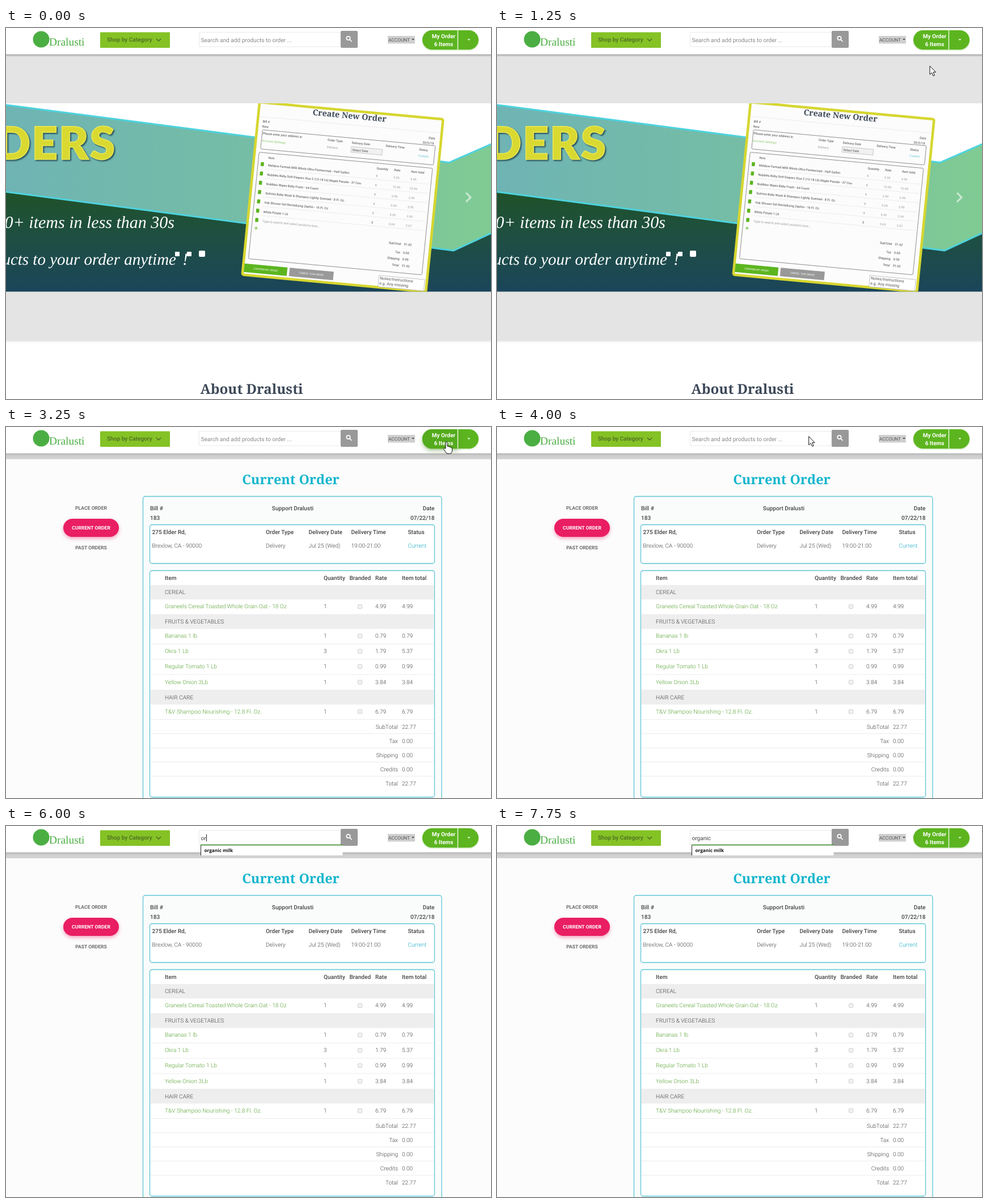
Recreate the animation shown at these times as an HTML page. Size 855 by 655 pixels, loop 8000 ms.

```html
<!DOCTYPE html>
<html lang="en">
<head>
<meta charset="utf-8">
<title>Grocery order</title>
<style>
html, body { margin: 0; width: 100%; height: 100%; overflow: hidden; background: #fff; }
svg { display: block; text-rendering: geometricPrecision; }
text { font: 400 10.1px Roboto, sans-serif; fill: #555; white-space: pre; }
.b { font-weight: 500; fill: #444; }
.l { font-weight: 300; fill: #444; }
.g { font-weight: 300; fill: #55a030; }
.m { text-anchor: middle; }
.e { text-anchor: end; }
.w { font-weight: 700; font-size: 10px; fill: #fff; }
.nav { font-size: 8.65px; font-weight: 500; }
.head { font: 700 23.4px "Roboto Slab", "Noto Serif", serif; }
.script { font: italic 400 30px "Liberation Serif", serif; fill: #fff; }
.big { font: 900 80px Lato, sans-serif; letter-spacing: 2px; fill: #d9d931; stroke: #ebe957; stroke-width: 1.5; filter: drop-shadow(2px 2px 1px #29525c); }
.s { font-size: 5.5px; font-weight: 500; fill: #666; }
.f { font-size: 5.5px; fill: #999; }
.tiny { font-size: 4.5px; fill: #fff; }
.note { font-size: 7px; }
.drop { font: 700 8.2px "Open Sans", sans-serif; fill: #111; }
.box { fill: #fff; stroke: #5ec6d6; stroke-width: 1.3; }
.line { stroke: #ececec; }
</style>
</head>
<body>
<svg width="855" height="655" viewBox="0 0 855 655">
  <defs>
    <linearGradient id="band"><stop stop-color="#6fb4b4"/><stop offset=".5" stop-color="#75bda5"/><stop offset="1" stop-color="#80cb93"/></linearGradient>
    <linearGradient id="dark" x2="0" y2="1"><stop stop-color="#1f5229"/><stop offset=".45" stop-color="#1f4f42"/><stop offset="1" stop-color="#1b455a"/></linearGradient>
    <linearGradient id="shade" x2="0" y2="1"><stop stop-color="#000" stop-opacity=".32"/><stop offset="1" stop-color="#000" stop-opacity="0"/></linearGradient>
    <linearGradient id="strip" x2="0" y2="1"><stop stop-color="#adadad"/><stop offset=".4" stop-color="#cdcdcd"/><stop offset="1" stop-color="#d6d6d6"/></linearGradient>
    <clipPath id="slide"><path d="M0 133H855V465.500H0Z"/></clipPath>
  </defs>

  <g id="home">
    <path fill="#fff" d="M0 0H855V655H0Z"/>
    <path fill="#e4e4e4" d="M0 46H855V552H0Z"/>
    <path fill="url(#shade)" d="M0 46H855V51H0Z"/>
    <path fill="url(#shade)" opacity=".3" d="M0 552H855V556H0Z"/>
    <g clip-path="url(#slide)">
      <path fill="#fff" d="M0 133H855V466H0Z"/>
      <path fill="url(#dark)" d="M0 289 790 393 855 362V466H0Z"/>
      <path fill="url(#band)" stroke="#4dd3df" stroke-width="3" d="M-5 135 781 237.500 860 203V360L789 393-5 288.500Z"/>
      <text class="big e" x="194" y="232">DERS</text>
      <text class="script e" x="297" y="353">0+ items in less than 30s</text>
      <text class="script e" x="300" y="418" style="font-size:29px">ucts to your order anytime</text>
      <text class="script" x="311" y="418">!</text>
      <g fill="#fff"><rect x="298" y="395" width="8" height="8" rx="1"/><rect x="319" y="395" width="8" height="8" rx="1"/><rect x="340" y="393" width="11" height="11" rx="2"/></g>
      <g id="card" transform="translate(447 131) rotate(5.3) skewX(-.4)"></g>
      <path d="M811 291l8 8-8 8" fill="none" stroke="#fff" stroke-opacity=".6" stroke-width="3"/>
    </g>
    <text class="head m" x="433" y="646" style="font-size:24.200px;fill:#3c4858">About Dralusti</text>
  </g>

  <g id="order">
    <path fill="#fcfcfc" d="M0 0H855V655H0Z"/>
    <path fill="url(#strip)" d="M0 46H855V57H0Z"/>
    <text class="head m" x="502" y="101" style="fill:#14b5cd">Current Order</text>
    <rect x="101" y="162" width="98" height="32" rx="16" fill="#e91e63" style="filter:drop-shadow(0 3px 3px #e91e6366)"/>
    <rect class="box" x="241.500" y="122.500" width="526.500" height="560" rx="4" style="fill:#fafcfc"/>
    <rect class="box" x="253.500" y="172.500" width="502" height="68.500" rx="4"/>
    <rect class="box" x="253.500" y="253.500" width="502" height="400" rx="4"/>
    <g id="bill"></g>
  </g>

  <g id="header">
    <path fill="#fff" d="M0 0H855V46.500H0Z"/>
    <circle cx="62" cy="20" r="14.500" fill="#4bae43"/>
    <text x="76" y="30.500" style="font:19.400px 'Liberation Serif',serif;fill:#4bae43">Dralusti</text>
    <rect x="166" y="7.500" width="123" height="27.500" rx="1" fill="#84c225"/>
    <text class="b" x="178" y="24" style="fill:#4d6a25">Shop by Category</text>
    <path d="M265 19l4 4 4-4" fill="none" stroke="#4d6a25" stroke-width="1.500"/>
    <path d="M340.500 7.500H590V33H340.500Z" fill="#fff" stroke="#e9e9e9"/>
    <text id="hint" x="343.500" y="24.500" style="fill:#888">Search and add products to order ...</text>
    <rect x="590" y="5" width="30" height="30" rx="2" fill="#999"/>
    <g fill="none" stroke="#fff" stroke-width="1.700"><circle cx="603.500" cy="18" r="3.200"/><path d="M606 20.500l3.500 3.500"/></g>
    <path fill="#cfcfcf" d="M673 14H721V27.500H673Z"/>
    <text x="674" y="23.500" style="font-size:8.300px">ACCOUNT</text>
    <path d="M715 19h5l-2.500 2.500Z" fill="#444"/>
    <rect x="734" y="4" width="99" height="34" rx="17" fill="#5cb51f" style="filter:drop-shadow(0 1px 1px #5cb51f88)"/>
    <path id="hover" d="M797 4H751a17 17 0 0 0 0 34H797Z" fill="#54ab1c" style="filter:drop-shadow(0 4px 4px #46851f66)"/>
    <path d="M796.500 4V38" stroke="#e9f6df" stroke-width="1.500"/>
    <text class="w m" x="771.500" y="17.500">My Order</text>
    <text class="w m" x="771.500" y="31.500">6 Items</text>
    <path d="M813.500 19.500h5l-2.500 2.500Z" fill="#fff"/>
  </g>

  <g id="menu">
    <rect id="panel" x="343" y="33" width="250.500" fill="#fff"/>
    <path id="side" stroke="#222"/>
    <path d="M343 33.500H593.500" stroke="#35851f" stroke-width="1.300"/>
    <g id="options"></g>
  </g>
  <text id="typed" x="343.500" y="24.500" style="fill:#444"></text>
  <path id="caret" stroke="#222"/>
  <g id="cursor" stroke="#111" fill="#fff" stroke-linejoin="round">
    <path id="arrow" d="M0 0V15L3.500 12 6 17.500 8.500 16.500 6 11H10.500Z"/>
    <path id="hand" d="M4 11V2q0-2 1.500-2T7 2V8q3-.5 3 1 3-.5 3 1 2.500-.5 2.500 2V16q0 5-5 5H8q-3 0-4-3L0 12.500q0-2 4-.5Z"/>
    <path id="beam" fill="none" d="M-3 0H3M0 0V16M-3 16H3"/>
  </g>
</svg>
<script>
const $ = id => document.getElementById(id);
const T = (x, y, s, cls = '') => `<text x="${x}" y="${y}" class="${cls}">${s}</text>`;
const R = (x, y, w, h, attrs) => `<rect x="${x}" y="${y}" width="${w}" height="${h}" ${attrs}/>`;
const L = (x1, y, x2) => `<path class="line" d="M${x1} ${y}H${x2}"/>`;

function drawCard() {
  const items = [
    ['Meldow Farmed Milk Whole Ultra Pasteurized - Half Gallon', 1, '5.59', '5.59'],
    ['Nubbles Baby Soft Diapers Size 2 (12-18 Lb) Maple Parade - 37 Cou', 1, '10.99', '10.99'],
    ['Nubbles Wipes Baby Fresh - 64 Count', 1, '2.99', '2.99'],
    ['Solmira Baby Wash &amp; Shampoo Lightly Scented - 8 Fl. Oz.', 1, '5.99', '5.99'],
    ['Vok Shower Gel Revitalizing Zephin - 16 Fl. Oz', 1, '3.99', '3.99'],
    ['White Potato 1 Lb', 3, '0.69', '2.07'],
  ];
  const frame = 'fill="none" stroke="#777" stroke-width=".8"';
  let s = R(0, 0, 325, 306, 'rx="3" fill="#fcfcfc" stroke="#d6d630" stroke-width="4.500"')
    + '<text class="head" x="95" y="14" style="font-size:14.300px;fill:#3c4858">Create New Order</text>'
    + L(3, 25, 322) + R(10, 48, 306, 34, frame + ' rx="2"') + R(8, 88, 307, 189, frame + ' rx="2"')
    + R(169, 63, 55, 10, 'fill="#f1f1f1" stroke="#aaa" stroke-width=".6"');
  for (const [x, y, str] of [[9, 35, 'Bill #'], [9, 44, 'New'], [303, 37, 'Date'], [293, 46, '20/5/18'],
    [11, 56, 'Please enter your address in'], [126, 57, 'Order Type'], [169, 58, 'Delivery Date'],
    [229, 58, 'Delivery Time'], [288, 59, 'Status'], [171, 70.5, 'Select Date'], [25, 98, 'Item'],
    [217, 99, 'Quantity'], [248, 99, 'Rate'], [278, 99, 'Item total']]) s += T(x, y, str, 's');
  s += T(11, 69, '<tspan fill="#8bc96a">Account Settings</tspan>', 'f') + T(126, 69.5, 'Delivery', 'f')
    + T(288, 70, '<tspan fill="#5cc5d6">Current</tspan>', 'f');
  items.forEach(([name, qty, rate, total], i) => {
    const y = 111.5 + 16.5 * i;
    s += T(26, y, name, 's') + T(217, y + 1, qty, 's') + T(248, y + 1, rate, 'f') + T(278, y + 1, total, 'f')
      + L(22, y + 5, 312);
  });
  for (let i = 0; i < 7; i++) s += R(13, 105 + 16.5 * i, 5.5, 7, 'rx="1" fill="#5cb51f"');
  s += T(26, 210.5, 'Type to search and select products here...', 'f')
    + '<path d="M13 222h6m-3-3v6" stroke="#5cb51f"/>';
  [['SubTotal', '31.62', 228], ['Tax', '0.00', 243], ['Shipping', '0.00', 254.5], ['Total', '31.62', 266]]
    .forEach(([k, v, y]) => s += T(273, y, k, 's e') + T(278, y, v, 's'));
  s += R(2, 286, 76, 15, 'fill="#5cb51f"') + R(82, 286, 78, 15, 'fill="#999"')
    + T(40, 295, 'CONFIRM MY ORDER', 'tiny m') + T(121, 295, 'CANCEL THIS ORDER', 'tiny m')
    + R(240, 285, 81, 20, 'fill="#fff" stroke="#aaa" stroke-width=".7"')
    + T(242, 292, 'Notes/Instructions', 'note') + T(242, 301, 'e.g. Any missing', 'note');
  $('card').innerHTML = s;
}

function drawBill() {
  const cols = [280, 560, 651, 698];
  let s = T(150, 145.5, 'PLACE ORDER', 'nav m') + T(150, 216, 'PAST ORDERS', 'nav m')
    + '<text class="nav m" x="150" y="180.500" style="fill:#fff;font-weight:700">CURRENT ORDER</text>';
  for (const [x, y, str, cls] of [[254, 146.5, 'Bill #', 'b'], [254, 164, '183', 'b'],
    [505.5, 146.5, 'Support Dralusti', 'b m'], [755.5, 146.5, 'Date', 'b e'], [755.5, 164, '07/22/18', 'b e'],
    [257.5, 188.5, '275 Elder Rd,', 'b'], [458, 188.5, 'Order Type', 'b'], [533.5, 188.5, 'Delivery Date', 'b'],
    [608.5, 188.5, 'Delivery Time', 'b'], [708.5, 188.5, 'Status', 'b'], [257.5, 213, 'Brexlow, CA - 90000', 'l'],
    [458, 213, 'Delivery', 'l'], [533.5, 213, 'Jul 25 (Wed)', 'l'], [608.5, 213, '19:00-21:00', 'l'],
    [708.5, 213, '<tspan fill="#14a9c4">Current</tspan>', 'l'], [605.5, 270, 'Branded', 'b']]) s += T(x, y, str, cls);
  ['Item', 'Quantity', 'Rate', 'Item total'].forEach((h, i) => s += T(cols[i], 270, h, 'b'));
  [[279, 'CEREAL'], [331, 'FRUITS &amp; VEGETABLES'], [464.5, 'HAIR CARE']]
    .forEach(([y, name]) => s += R(254.5, y, 500.5, 25.5, 'fill="#eeeeee"') + T(280, y + 16, name, 'l'));
  [[320, 'Graneels Cereal Toasted Whole Grain Oat - 18 Oz', 1, '4.99', '4.99'],
    [372, 'Bananas 1 lb', 1, '0.79', '0.79'], [399, 'Okra 1 Lb', 3, '1.79', '5.37'],
    [426, 'Regular Tomato 1 Lb', 1, '0.99', '0.99'], [453.5, 'Yellow Onion 3Lb', 1, '3.84', '3.84'],
    [505.5, 'T&amp;V Shampoo Nourishing - 12.8 Fl. Oz.', 1, '6.79', '6.79']]
    .forEach(([y, ...cells]) => {
      cells.forEach((c, i) => s += T(cols[i], y, c, i ? 'l' : 'g'));
      s += R(620.5, y - 6.5, 7, 7, 'rx="1" fill="#f2f2f2" stroke="#cfcfcf"') + L(255, y + 11, 755);
    });
  [['SubTotal', '22.77'], ['Tax', '0.00'], ['Shipping', '0.00'], ['Credits', '0.00'], ['Total', '22.77']]
    .forEach(([k, v], i) => {
      const y = 532.5 + 25 * i;
      s += T(691, y, k, 'l e') + T(698, y, v, 'l') + (i < 4 ? L(255, y + 9, 755) : '');
    });
  $('bill').innerHTML = s;
}

const STEP = 250, LOOP = 8000;
const track = [[750, 800, 180], [1250, 763, 67], [1750, 771, 30], [2000, 771, 30],
  [2750, 771, 25], [3250, 771, 26], [3500, 771, 26], [4250, 439, 12]];
const suggestions = ['tindoora', 'filter coffee', 'eggplant', 'bramel flour tortilla', 'egg', 'shredded coconut'];
const show = (id, on) => $(id).style.display = on ? '' : 'none';

function cursorAt(t) {
  const i = Math.max(1, track.findIndex(k => k[0] >= t));
  const [a, b] = [track[i - 1], track[i]];
  const p = (t - a[0]) / (b[0] - a[0]);
  return [a[1] + (b[1] - a[1]) * p, a[2] + (b[2] - a[2]) * p];
}

function typedCount(t) {
  if (t < 5750) return 0;
  if (t < 6000) return 1;
  return t < 6500 ? 2 : Math.min(7, 3 + (t - 6500) / STEP);
}

function render(time) {
  const t = Math.floor(time % LOOP / STEP) * STEP;
  const ordering = t >= 3250, searching = t >= 4500;
  show('home', !ordering);
  show('order', ordering);
  show('hover', t >= 1750 && t < 3750);

  const pointing = t >= 750 && t <= 4250;
  show('cursor', pointing);
  if (pointing) {
    const [x, y] = cursorAt(t);
    $('cursor').setAttribute('transform', `translate(${x} ${y})`);
    const kind = t === 4250 ? 'beam' : ordering && x > 734 ? 'hand' : 'arrow';
    for (const id of ['arrow', 'hand', 'beam']) show(id, id === kind);
  }

  const word = 'organic'.slice(0, typedCount(t));
  $('typed').textContent = word;
  show('hint', !word);
  show('menu', searching);
  const list = t < 6000 ? suggestions : ['organic milk'];
  const height = 1.5 + 17.4 * list.length;
  $('panel').setAttribute('height', height);
  $('side').setAttribute('d', `M343.5 33v${height}`);
  $('options').innerHTML = list.map((s, i) => T(349.5, 45.5 + 17.4 * i, s, 'drop')).join('');

  show('caret', searching && t !== 5000 && t < 7750);
  const end = Math.round(343.5 + (word ? $('typed').getComputedTextLength() : 0)) + .5;
  $('caret').setAttribute('d', `M${end} 14.5V27`);
}

drawCard();
drawBill();
const start = performance.now();
(function frame() {
  render(performance.now() - start);
  requestAnimationFrame(frame);
})();
</script>
</body>
</html>
```
